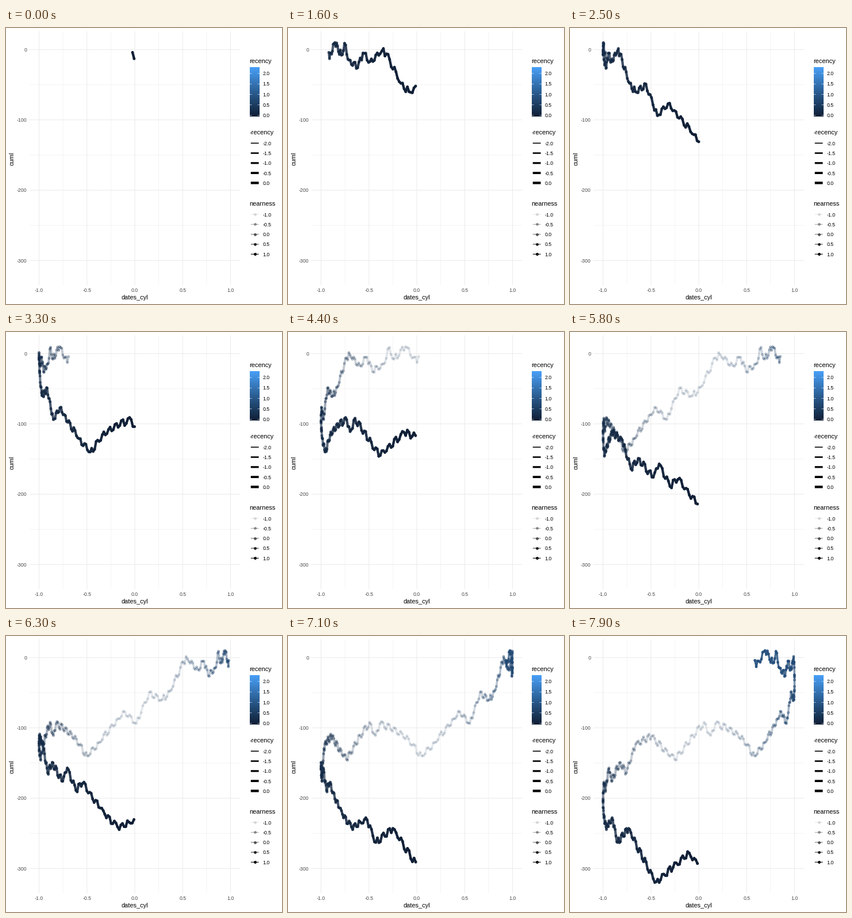
Recreate the animation shown at these times as a matplotlib script. Size 480 by 480 pixels, loop 8 s.

```python
import numpy as np
import matplotlib.pyplot as plt
from matplotlib.animation import FuncAnimation
from matplotlib.collections import LineCollection
from matplotlib.colors import LinearSegmentedColormap

plt.rcParams["font.family"] = "Liberation Sans"

SIZE, DPI = 480, 72          # at 72 dpi one point is one pixel
FRAMES, INTERVAL = 80, 100
START, STEP = 1.4, 4.1445    # days shown at first, days per frame
YEAR = 365.25
MAX_RECENCY = 2.28
LEFT, RIGHT, TOP, BOTTOM = 41, 407, 5.5, 447
KEY_X, KEY = 424, 17.28
GREY, DARK = "#EBEBEB", "#4D4D4D"

BLUES = LinearSegmentedColormap.from_list(
    "blues", ["#101F35", "#2B5E93", "#489FF6"])

# Main turns of the cumulative series: (day, value)
TURNS = [
    (0, -4), (1, -13), (8, 10), (15, -8), (18, 9), (22, -15), (29, -26),
    (33, -5), (38, -17), (46, -2), (49, -6), (58, -48), (63, -60),
    (71, -49), (79, -94), (86, -77), (102, -121), (110, -140), (122, -108),
    (136, -94), (139, -111), (143, -92), (161, -145), (176, -112),
    (188, -123), (196, -164), (202, -149), (213, -176), (217, -157),
    (224, -189), (229, -179), (241, -214), (252, -241), (264, -231),
    (270, -263), (281, -243), (302, -319), (323, -278), (328, -293),
]


def px(v):
    return 224 + 166.5 * v


def py(v):
    return 37.5 - 1.2226 * v


def make_series():
    """Straight trends between the turns with a random zigzag on top."""
    turn_days, turn_vals = np.array(TURNS).T
    days = np.arange(turn_days[-1] + 1)
    side = np.where(days // 2 % 2, 1, -1)
    zigzag = side * np.random.default_rng(4).uniform(1, 5, len(days))
    zigzag[turn_days] = 0
    return days, np.interp(days, turn_days, turn_vals) + zigzag


def width(recency):
    share = np.clip(1 - recency / MAX_RECENCY, 0, 1)
    return 2.134 * (0.1 + 1.9 * np.sqrt(share))


def alpha(nearness):
    return 0.1 + 0.45 * (nearness + 1)


def label(x, y, s, size=8.8, color="black", **kw):
    ax.text(x, y, s, fontsize=size, color=color, va="baseline", **kw)


def line(xs, ys, color, lw, **kw):
    ax.plot(xs, ys, color=color, lw=lw, solid_capstyle="butt",
            snap=False, **kw)


def make_dots(x, y, **kw):
    return ax.scatter(x, y, s=3.9 ** 2, lw=0.94, **kw)


def draw_panel():
    def vline(v, lw):
        line([px(v)] * 2, [TOP, BOTTOM], GREY, lw, zorder=0)

    def hline(v, lw):
        line([LEFT, RIGHT], [py(v)] * 2, GREY, lw, zorder=0)

    for v in np.arange(-0.75, 1, 0.5):
        vline(v, 0.53)
    for v in range(-50, -251, -100):
        hline(v, 0.53)
    for v in np.arange(-1, 1.1, 0.5):
        vline(v, 1.07)
        label(px(v), 459, f"{v:.1f}", color=DARK, ha="center")
    for v in range(0, -301, -100):
        hline(v, 1.07)
        label(36, py(v) + 3.4, str(v), color=DARK, ha="right")
    label(224, 471.5, "dates_cyl", 11, ha="center")
    ax.text(10, 227, "cuml", fontsize=11, rotation=90, ha="center",
            va="center")


def draw_legends():
    for title, y in (("recency", 61), ("-recency", 185), ("nearness", 309)):
        label(KEY_X - 0.8, y, title, 11)

    ramp = np.linspace(1, 0, 200)[:, None]
    ax.imshow(ramp, cmap=BLUES, aspect="auto", zorder=1,
              extent=(KEY_X, KEY_X + 17, 154, 68))
    ends = [KEY_X + 0.1 * KEY, KEY_X + 0.9 * KEY]
    for i in range(5):
        half = i / 2

        y = 152 - 18.25 * i
        for x in (KEY_X, KEY_X + 0.8 * 17):
            line([x, x + 0.2 * 17], [y, y], "white", 0.6)
        label(446.5, y + 3.2, f"{half:.1f}")

        y = 200.3 + KEY * i
        line(ends, [y, y], "black", width(2 - half))
        label(446.5, y + 3.4, f"{half - 2:.1f}")

        y = 324.2 + KEY * i
        a = alpha(half - 1)
        line(ends, [y, y], "black", 1.07, alpha=a)
        make_dots([KEY_X + KEY / 2], [y], color="black", alpha=a, zorder=3)
        label(446.5, y + 3.4, f"{half - 1:.1f}")


def update(i):
    now = START + STEP * i
    seen = days <= now
    age = (now - days[seen]) / YEAR
    angle = 2 * np.pi * age      # the time axis is wrapped round a cylinder
    pts = np.column_stack([px(-np.sin(angle)), py(vals[seen])])
    colors = BLUES(age / MAX_RECENCY)
    colors[:, 3] = alpha(np.cos(angle))

    path.set_segments(np.stack([pts[:-1], pts[1:]], axis=1))
    path.set_color(colors[:-1])
    path.set_linewidth(width(age[:-1]))
    dots.set_offsets(pts)
    dots.set_color(colors)
    return path, dots


days, vals = make_series()

fig = plt.figure(figsize=(SIZE / DPI, SIZE / DPI), dpi=DPI,
                 facecolor="white")
ax = fig.add_axes([0, 0, 1, 1])
draw_panel()
draw_legends()
path = LineCollection([], capstyle="butt", zorder=4)
ax.add_collection(path)
dots = make_dots([], [], zorder=5)
ax.set(xlim=(0, SIZE), ylim=(SIZE, 0))
ax.axis("off")

anim = FuncAnimation(fig, update, frames=FRAMES, interval=INTERVAL,
                     init_func=lambda: update(0), repeat=True,
                     repeat_delay=0, blit=False)
plt.show()
```
